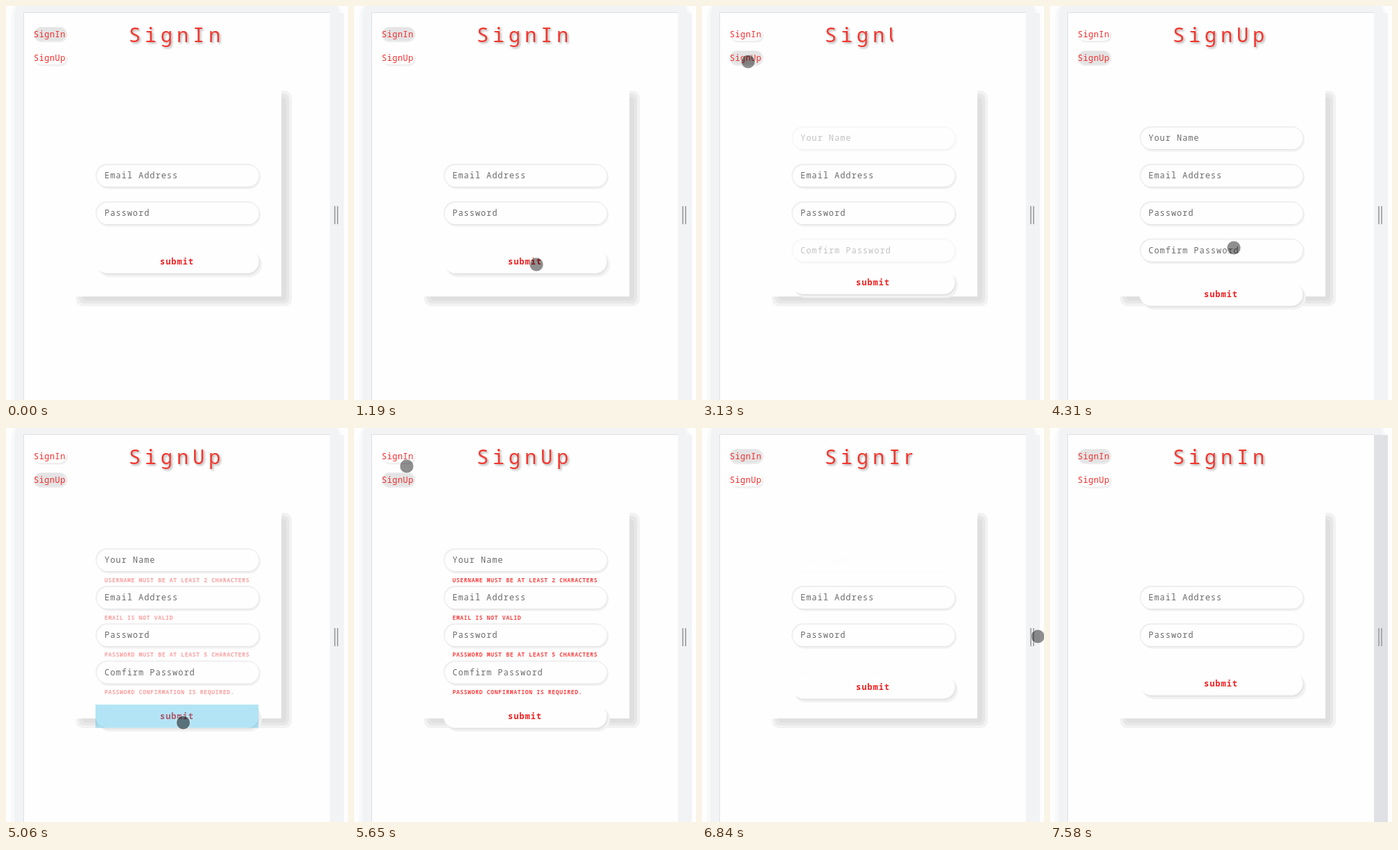
These frames come from a looping animation (493x567 px, 8.03 s). An HTML page:

```html
<!DOCTYPE html>
<html lang="en">
<head>
<meta charset="utf-8">
<title>Sign in form</title>
<style>
  html, body { margin: 0; width: 100%; height: 100%; overflow: hidden; background: #fefefe; }
  svg { display: block; }
  text { font: 12px "Noto Sans Mono", "DejaVu Sans Mono", monospace; fill: #6c6c6c; letter-spacing: .97px; white-space: pre; }
  .title { font-size: 28.8px; font-weight: 300; letter-spacing: 5.76px; fill: #f2382f; filter: drop-shadow(2px 2px 1.5px rgba(0, 0, 0, .3)); }
  .nav { letter-spacing: .45px; fill: #f22c2c; }
  .submit { font-weight: 700; fill: #f02020; }
  .error { font-size: 8px; font-weight: 600; letter-spacing: .71px; fill: #fb4040; }
</style>
</head>
<body>
<svg id="stage" width="493" height="567" viewBox="0 0 493 567">
  <defs><clipPath id="wipe"><rect id="wipeBox" y="20" height="50"/></clipPath></defs>
</svg>
<script>
const LOOP = 8030, TICK = 148.7;
const stage = document.getElementById('stage');
const wipeBox = document.getElementById('wipeBox');
const WHITE = '#fefefe', TAP = 'rgb(51,181,229)';

function add(parent, tag, attrs, content) {
  const el = document.createElementNS('http://www.w3.org/2000/svg', tag);
  set(el, attrs);
  if (content) el.textContent = content;
  return parent.appendChild(el);
}
function set(el, attrs) {
  for (const key in attrs) el.setAttribute(key, attrs[key]);
}
// Rounded box given by its edges
const box = (parent, left, top, right, bottom, rx, fill) =>
  add(parent, 'rect', { x: left, y: top, width: right - left, height: bottom - top, rx, fill });
const label = (parent, cls, x, y, content) => add(parent, 'text', { class: cls, x, y }, content);
const group = (parent = stage) => add(parent, 'g', {});
const show = (el, opacity) => set(el, { opacity });
const clamp = v => Math.max(0, Math.min(1, v));

// Device frame and drag handle
box(stage, 7, -12, 486, 700, 30, '#f8f9f9');
box(stage, 12, -12, 481, 700, 26, '#f1f3f4');
box(stage, 467, 10, 487, 567, 0, '#f1f3f4');
const hover = box(stage, 467, 10, 487, 567, 0, '#dfe1e5');
for (const x of [473, 477]) box(stage, x, 288, x + 2, 314, 0, '#a9abad');
box(stage, 25, 9, 467, 567, 0, '#dfe2e6');
box(stage, 26, 10, 467, 567, 0, WHITE);

// Card with its stepped shadow
box(stage, 101, 122, 412, 432, 10, '#f2f2f2');
box(stage, 105, 126, 408, 428, 8, '#e7e7e7');
box(stage, 110, 131, 404, 424, 6, '#dfdfdf');
box(stage, 91, 112, 397, 418, 0, WHITE);

// Navigation
function navItem(y, name) {
  const idle = group(), active = group();
  box(idle, 42, y + 3, 89, y + 22.5, 10, '#efefef');
  box(idle, 40, y, 87, y + 20, 10, WHITE);
  box(active, 40, y, 88.5, y + 22, 11, '#ececec');
  box(active, 41, y + 1, 86, y + 20, 10, '#e4e4e4');
  label(stage, 'nav', 40, y + 15, name);
  return { idle, active, tap: box(stage, 40, y, 87, y + 20, 0, TAP) };
}
const navIn = navItem(30, 'SignIn'), navUp = navItem(64, 'SignUp');

// Title: fixed stem and a wiped ending
label(stage, 'title', 176.8, 52, 'Sign');
const ending = label(add(stage, 'g', { 'clip-path': 'url(#wipe)' }), 'title', 269, 52, 'In');

function field(y, placeholder) {
  const g = group();
  box(g, 131, y + 2, 367, y + 36.5, 17, '#f1f1f1');
  box(g, 130, y + 1, 365.2, y + 34.2, 17, '#e3e3e3');
  box(g, 129, y, 364.5, y + 33, 16.5, '#efefef');
  box(g, 131, y + 2, 364.5, y + 33, 15.5, WHITE);
  label(g, '', 142, y + 21, placeholder);
  return g;
}
const extraFields = [field(173, 'Your Name'), field(334.5, 'Comfirm Password')];
field(227, 'Email Address');
field(281, 'Password');

function errorSet(...lines) {
  const g = group();
  for (const [y, content] of lines) label(g, 'error', 142, y, content);
  return g;
}
const errorsIn = errorSet([275.5, 'EMAIL IS NOT VALID'], [329, 'PASSWORD IS REQUIRED.']);
const errorsUp = errorSet(
  [221.5, 'USERNAME MUST BE AT LEAST 2 CHARACTERS'], [275.5, 'EMAIL IS NOT VALID'],
  [329, 'PASSWORD MUST BE AT LEAST 5 CHARACTERS'], [383, 'PASSWORD CONFIRMATION IS REQUIRED.']);

// Submit button, drawn from its own top edge
const submit = group();
const wideShadow = group(submit);
box(wideShadow, 129, -1, 371.5, 41.5, 20, '#f3f3f3');
box(submit, 132, 3, 369, 39, 18, '#f2f2f2');
box(submit, 131, 2, 366, 36, 17, '#e5e5e5');
box(submit, 129, 0, 364.5, 33.5, 16.7, WHITE);
label(submit, 'submit', 222, 21, 'submit');
const submitTap = box(submit, 129, 0, 364, 33.5, 0, TAP);

const pointer = add(stage, 'circle', { r: 10, stroke: '#fff', 'stroke-opacity': .7 });

// Pointer path: tick, x, y
const path = [
  [4, 306, 284], [8, 263, 372], [13, 263, 372], [14, 236, 322], [15, 190, 220],
  [16, 129.5, 108.5], [17, 88, 84], [18, 66.5, 80], [28, 66.5, 80], [29, 265, 348],
  [31, 255.5, 424], [35, 255.5, 424], [36, 160.5, 161.5], [37, 100, 90], [38, 76, 55],
  [40, 66, 42], [42, 66, 42], [43, 140, 90], [46, 484, 300]
];
function pointerAt(k) {
  const i = path.findIndex(p => p[0] >= k);
  if (i < 1) return path[0].slice(1);
  const [a, ax, ay] = path[i - 1], [b, bx, by] = path[i], f = (k - a) / (b - a);
  return [ax + (bx - ax) * f, ay + (by - ay) * f];
}

const SUBMIT_IN = 11, GO_UP = 19, SUBMIT_UP = 34, GO_IN = 42;

function draw(k) {
  const signUp = k >= GO_UP && k < GO_IN;
  const leaving = k >= GO_IN;
  const since = k - (leaving ? GO_IN : GO_UP);
  const p = clamp(since / 5);

  show(navIn.active, +!signUp);
  show(navIn.idle, +signUp);
  show(navUp.active, +signUp);
  show(navUp.idle, +!signUp);
  show(navIn.tap, k === GO_IN ? .22 : 0);
  show(navUp.tap, k === GO_UP ? .22 : 0);

  // The old ending is wiped away, then the new one is revealed
  const wiping = since === 0;
  ending.textContent = signUp !== wiping ? 'Up' : 'In';
  const reveal = since < 0 ? 1 : clamp((since - 1) / 4);
  set(wipeBox, wiping ? { x: 301, width: 20 } : { x: 262, width: 55 * reveal });

  for (const f of extraFields) show(f, leaving ? .3 * (1 - p) ** 3 : p);
  const shift = leaving ? 1 - p * p * (3 - 2 * p) : 1 - (1 - p) ** 2;
  set(submit, { transform: `translate(0 ${351 + 47 * shift})` });
  show(wideShadow, k >= 14 && k < 18 ? 1 : 0);
  show(submitTap, k === SUBMIT_IN || k === SUBMIT_UP ? .37 : 0);

  show(errorsIn, k < SUBMIT_IN || k >= GO_UP ? 0 : k === SUBMIT_IN ? .5 : 1);
  show(errorsUp, k < SUBMIT_UP || k >= GO_IN ? 0 : k === SUBMIT_UP ? .5 : 1);

  const [cx, cy] = pointerAt(Math.min(k, 46));
  const pressed = [SUBMIT_IN, GO_UP, SUBMIT_UP, GO_IN].includes(k);
  set(pointer, { cx, cy, 'fill-opacity': pressed ? .5 : .44, opacity: k >= 4 && k < 47 ? 1 : 0 });

  show(hover, clamp((k - 48) / 3));
}

function frame() {
  draw(Math.floor((performance.now() % LOOP + 10) / TICK));
  requestAnimationFrame(frame);
}
frame();
</script>
</body>
</html>
```
